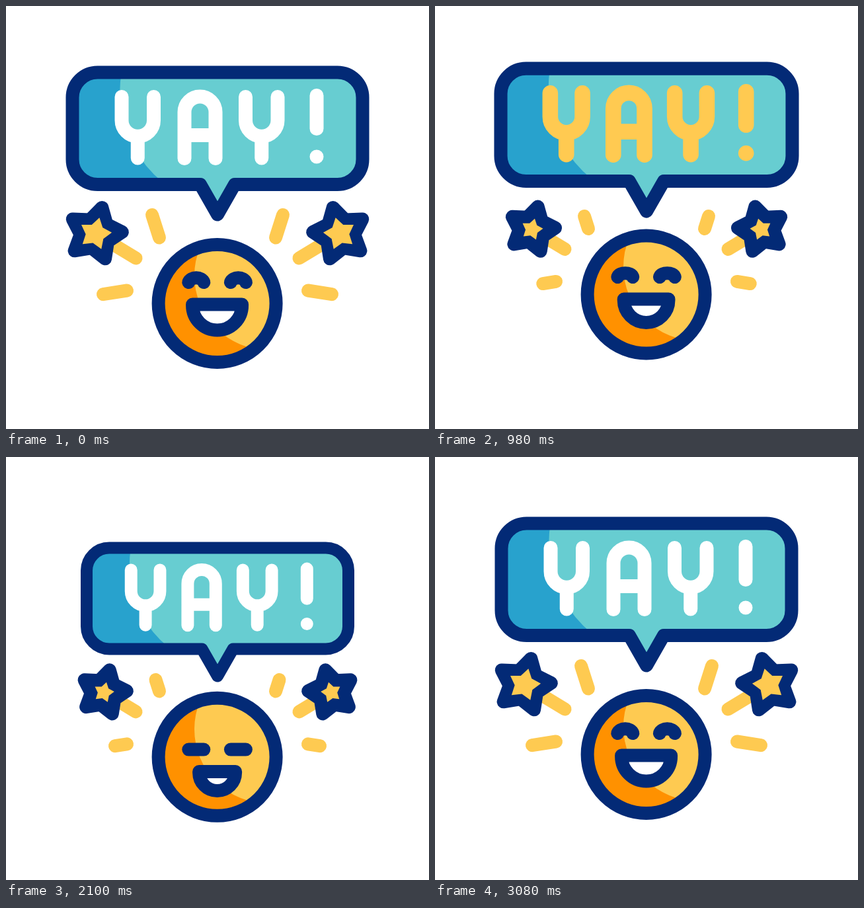
Write an HTML page with a canvas that moves like this. It is 640x640 px and loops after 3600 ms.

```html
<!DOCTYPE html>
<html lang="en">
<head>
<meta charset="utf-8">
<title>Yay!</title>
<style>
  html, body { margin: 0; width: 100%; height: 100%; overflow: hidden; background: #fff; }
  canvas { display: block; width: 100vw; height: 100vh; object-fit: contain; }
</style>
</head>
<body>
<canvas width="640" height="640" role="img" aria-label="YAY!"></canvas>
<script>
const ctx = document.querySelector('canvas').getContext('2d');
const NAVY = '#032a76', YELLOW = '#feca51', ORANGE = '#ff9100';
const TEAL = '#67cdd1', BLUE = '#28a2cd', WHITE = '#fff';
const LOOP = 3600, STEP = 20, CX = 319.6;

// Beats in ms: rest, squash, hop, dip, high hop, landing, rebound, settle, rest.
const beats = [200, 420, 1150, 1300, 1680, 1970, 2240, 2470, 2900];
const motion = {
  head: { lag: 0, at: [0, 33, -20.4, -10.5, -34, 26, -21, 6, 0] },
  tip: { lag: 60, at: [0, 37, -17, -9, -26.7, 19, -7, 5, 0] },
  swell: { lag: 130, at: [0, -1.02, 0.65, 0.5, 1.04, -0.98, 0.41, 0.2, 0] },
  mood: { lag: 130, at: [0, -1, 0, 0.6, 1.06, -1, -0.1, 0, 0] },
  ray: { lag: 130, at: [1, 0, 0.86, 0.7, 0.72, 0.5, 0.94, 1, 1] }
};

const clamp = v => Math.max(0, Math.min(1, v));
const mix = (a, b, u) => a + (b - a) * u;
const smooth = u => (1 - Math.cos(Math.PI * clamp(u))) / 2;

function sample({ lag, at }, time) {
  const t = time - lag;
  let i = 0;
  while (i < beats.length - 2 && t >= beats[i + 1]) i++;
  return mix(at[i], at[i + 1], smooth((t - beats[i]) / (beats[i + 1] - beats[i])));
}

function stroke(path, color, width = 20) {
  ctx.strokeStyle = color;
  ctx.lineWidth = width;
  ctx.stroke(path);
}

function fill(path, color) {
  ctx.fillStyle = color;
  ctx.fill(path);
}

function circle(x, y, r) {
  const p = new Path2D();
  p.arc(x, y, r, 0, Math.PI * 2);
  return p;
}

// An outlined shape whose darker side shows outside the lit area.
function shaded(shape, light, dark, lit) {
  ctx.save();
  ctx.clip(shape);
  fill(shape, dark);
  fill(lit, light);
  ctx.restore();
  stroke(shape, NAVY);
}

const balloon = new Path2D('M138.5 100.5H501.5a38 38 0 0 1 38 38V232a38 38 0 0 1-38 38H346' +
  'L320 315.5 294 270H138.5a38 38 0 0 1-38-38V138.5a38 38 0 0 1 38-38Z');
const balloonLit = new Path2D('M349 0H700V400H349Z');
balloonLit.addPath(circle(349, 130, 176.7));
const letterY = 'V173a24.25 24.25 0 0 0 48.5 0V137.5m-24.25 59.75V230';
const letters = new Path2D('M175 137.5' + letterY + 'M362.5 137.5' + letterY +
  'M270 230.5V160.5a23.5 23.5 0 0 1 47 0V230.5M270 195.5H317M470 135.5V185.5M470 228v.01');

function drawBalloon({ tip, swell, tint }) {
  const scale = 1 + 0.1 * swell;
  ctx.save();
  ctx.translate(320, 326 + tip);
  ctx.scale(scale, scale);
  ctx.translate(-320, -326);
  shaded(balloon, TEAL, BLUE, balloonLit);
  const color = `rgb(255,${mix(255, 202, tint)},${mix(255, 81, tint)})`;
  stroke(letters, color, 21 + 2.5 * tint);
  ctx.restore();
}

function star(x, y, r, ratio) {
  const p = new Path2D();
  for (let i = 0; i < 10; i++) {
    const a = (-75.5 + i * 36) * Math.PI / 180, d = i % 2 ? r * ratio : r;
    p.lineTo(x + d * Math.cos(a), y + d * Math.sin(a));
  }
  p.closePath();
  return p;
}

// A line growing out of its inner end (x, y).
function beam(x, y, dx, dy, part, width) {
  stroke(new Path2D(`M${x} ${y}l${dx * part} ${dy * part}`), YELLOW, width);
}

function drawBurst(ray) {
  if (ray < 0.03) return;
  const width = 20 * clamp(ray * 4);
  const reach = mix(0.58, 1, ray);
  const size = Math.min(1.71 * ray, mix(0.71, 1, ray));
  const x = 196.5 - 61.4 * reach, y = 381.5 - 37.1 * reach;
  beam(232, 350.5, -11, -34.5, ray, width);
  beam(183, 430.5, -36, 5.7, ray, width);
  beam(196.5, 381.5, -61.4, -37.1, reach, width);
  const body = star(x, y, 40.8 * size, 0.55);
  fill(body, NAVY);
  stroke(body, NAVY, 20 * clamp(ray * 2));
  fill(star(x, y, Math.max(0, 25 - 63 * (1 - size)), 0.58), YELLOW);
}

const head = circle(CX, 450, 89);
const headLit = circle(397.5, 408, 112.5);

function drawFace({ head: headY, tip, mood }) {
  shaded(head, YELLOW, ORANGE, headLit);
  // Eyes and mouth follow the balloon rather than the head.
  const look = 1.65 * tip - headY;
  const joy = Math.max(0, mood), calm = Math.min(0, mood);
  const eyeY = 418 + look, top = eyeY - 9 - 5.5 * joy + 9 * calm * calm;
  for (const x of [276.3, 339.9])
    stroke(new Path2D(`M${x} ${eyeY}C${x + 3} ${top} ${x + 20} ${top} ${x + 23} ${eyeY}`), NAVY);
  const r = 37.5 + 2.5 * joy + 10 * calm, drop = 1.5 + 6.5 * joy;
  const mouth = new Path2D(
    `M${CX - r} ${451.5 + look}h${2 * r}v${drop}a${r} ${r} 0 0 1 ${-2 * r} 0Z`);
  fill(mouth, WHITE);
  stroke(mouth, NAVY);
}

function draw(t) {
  const pose = { tint: smooth((t - 700) / 180) - smooth((t - 1840) / 180) };
  for (const part in motion) pose[part] = sample(motion[part], t);
  ctx.fillStyle = WHITE;
  ctx.fillRect(0, 0, 640, 640);
  ctx.lineCap = ctx.lineJoin = 'round';
  drawBalloon(pose);
  ctx.save();
  ctx.translate(0, pose.head);
  drawBurst(pose.ray);
  ctx.save();
  ctx.translate(640, 0);
  ctx.scale(-1, 1);
  drawBurst(pose.ray);
  ctx.restore();
  drawFace(pose);
  ctx.restore();
}

const start = performance.now();
function tick() {
  const t = (performance.now() - start) % LOOP;
  draw(Math.floor(t / STEP) * STEP);
  requestAnimationFrame(tick);
}
tick();
</script>
</body>
</html>
```
